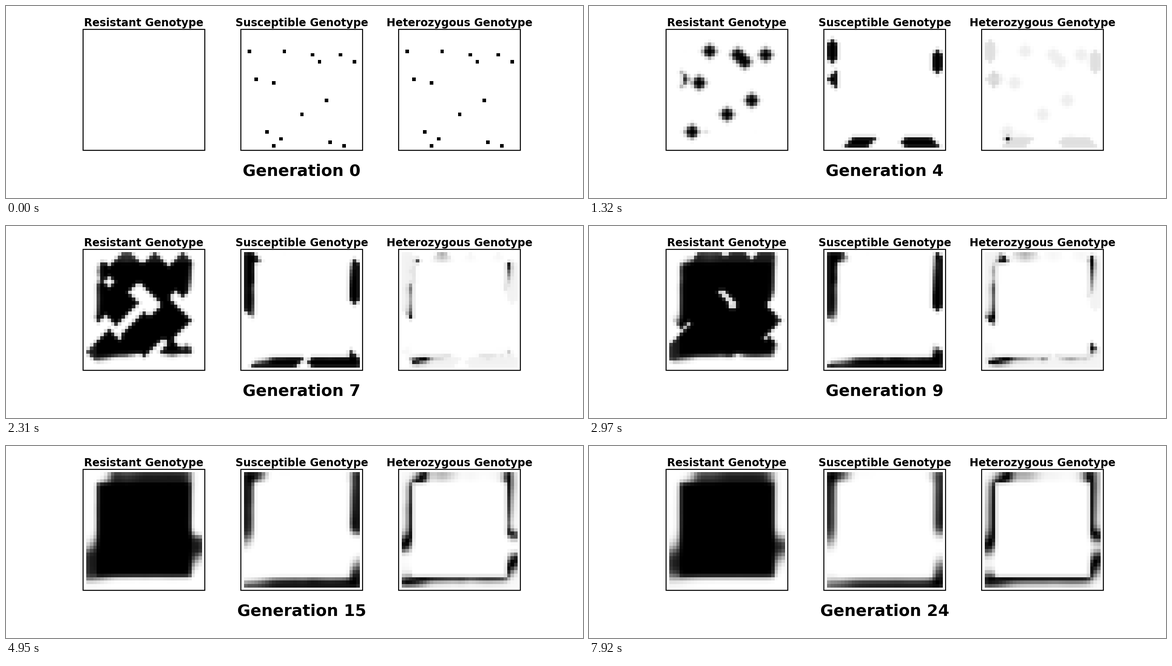
Recreate the animation shown at these times as a matplotlib script. Size 1280 by 427 pixels, loop 8000 ms.

```python
import numpy as np
import matplotlib.pyplot as plt
from matplotlib.animation import FuncAnimation
from matplotlib.patches import Rectangle

W, H, DPI = 1280, 427, 64
LOOP, TICK, GEN_MS = 8000, 20, 330
GENS = LOOP // GEN_MS + 1

SIZE, BORDER = 33, 3
CELL = 7.78
MOVE = 0.30            # share of adults leaving a cell
EGGS = 100             # offspring per adult, capped at one full cell
START, R_CARRIERS = 0.036, 0.03
FOUNDERS = [(5, 1), (5, 11), (6, 19), (6, 27), (8, 21), (8, 31), (13, 3),
            (14, 8), (19, 23), (23, 16), (28, 6), (30, 10), (31, 24),
            (32, 8), (32, 28)]

# Survival of SS, SR, RR in the refuge border and in the treated field
REFUGE = (1.0, 0.95, 0.90)
TREATED = (0.0, 0.10, 1.0)

SS, SR, RR = range(3)
PANELS = [("Resistant Genotype", RR, 305.9),
          ("Susceptible Genotype", SS, 656.0),
          ("Heterozygous Genotype", SR, 1006.1)]
MID_Y, BOX = 186.5, 269.3


def survival_map():
    fit = np.ones((3, SIZE, SIZE)) * np.reshape(REFUGE, (3, 1, 1))
    field = slice(BORDER, SIZE - BORDER)
    fit[:, field, field] = np.reshape(TREATED, (3, 1, 1))
    return fit


def disperse(n):
    p = np.pad(n, ((0, 0), (1, 1), (1, 1)))
    near = (p[:, :-2, 1:-1] + p[:, 2:, 1:-1]
            + p[:, 1:-1, :-2] + p[:, 1:-1, 2:])
    return (1 - MOVE) * n + MOVE / 4 * near


def breed(n, fit):
    total = n.sum(axis=0)
    r = (n[RR] + n[SR] / 2) / np.maximum(total, 1e-200)
    born = np.minimum(1, EGGS * total)
    return born * np.stack([(1 - r) ** 2, 2 * r * (1 - r), r ** 2]) * fit


def simulate():
    fit = survival_map()
    n = np.zeros((3, SIZE, SIZE))
    for row, col in FOUNDERS:
        n[SS, row, col] = START * (1 - R_CARRIERS)
        n[SR, row, col] = START * R_CARRIERS
    states = [n, disperse(n)]
    while len(states) < GENS:
        states.append(disperse(breed(states[-1], fit)))
    return states


def shade(grid):
    top = grid.max()
    return grid / top if top > 0 else grid


def px(size):
    return size * 72 / DPI


states = simulate()

fig = plt.figure(figsize=(W / DPI, H / DPI), dpi=DPI, facecolor="white")
ax = fig.add_axes([0, 0, 1, 1])
font = dict(family="DejaVu Sans", weight="bold", color="black",
            ha="center", va="baseline")

images = []
half = SIZE * CELL / 2
for title, kind, x in PANELS:
    image = ax.imshow(states[0][kind], cmap="gray_r", vmin=0, vmax=1,
                      interpolation="nearest", aspect="auto", origin="upper",
                      extent=(x - half, x + half, MID_Y + half, MID_Y - half))
    images.append((image, kind))
    ax.add_patch(Rectangle((x - BOX / 2, MID_Y - BOX / 2), BOX, BOX,
                           fill=False, ec="black", lw=px(2.2), zorder=3))
    ax.text(x, 45, title, fontsize=px(23.85), **font)
label = ax.text(655.8, 377.4, "", fontsize=px(35.75), **font)

ax.set_xlim(0, W)
ax.set_ylim(H, 0)
ax.axis("off")


def update(i):
    gen = (i * TICK + TICK // 2) // GEN_MS
    for image, kind in images:
        image.set_data(shade(states[gen][kind]))
    label.set_text(f"Generation {gen}")
    return [image for image, _ in images] + [label]


anim = FuncAnimation(fig, update, frames=LOOP // TICK, interval=TICK,
                     repeat=True, repeat_delay=0, blit=False)
plt.show()
```
